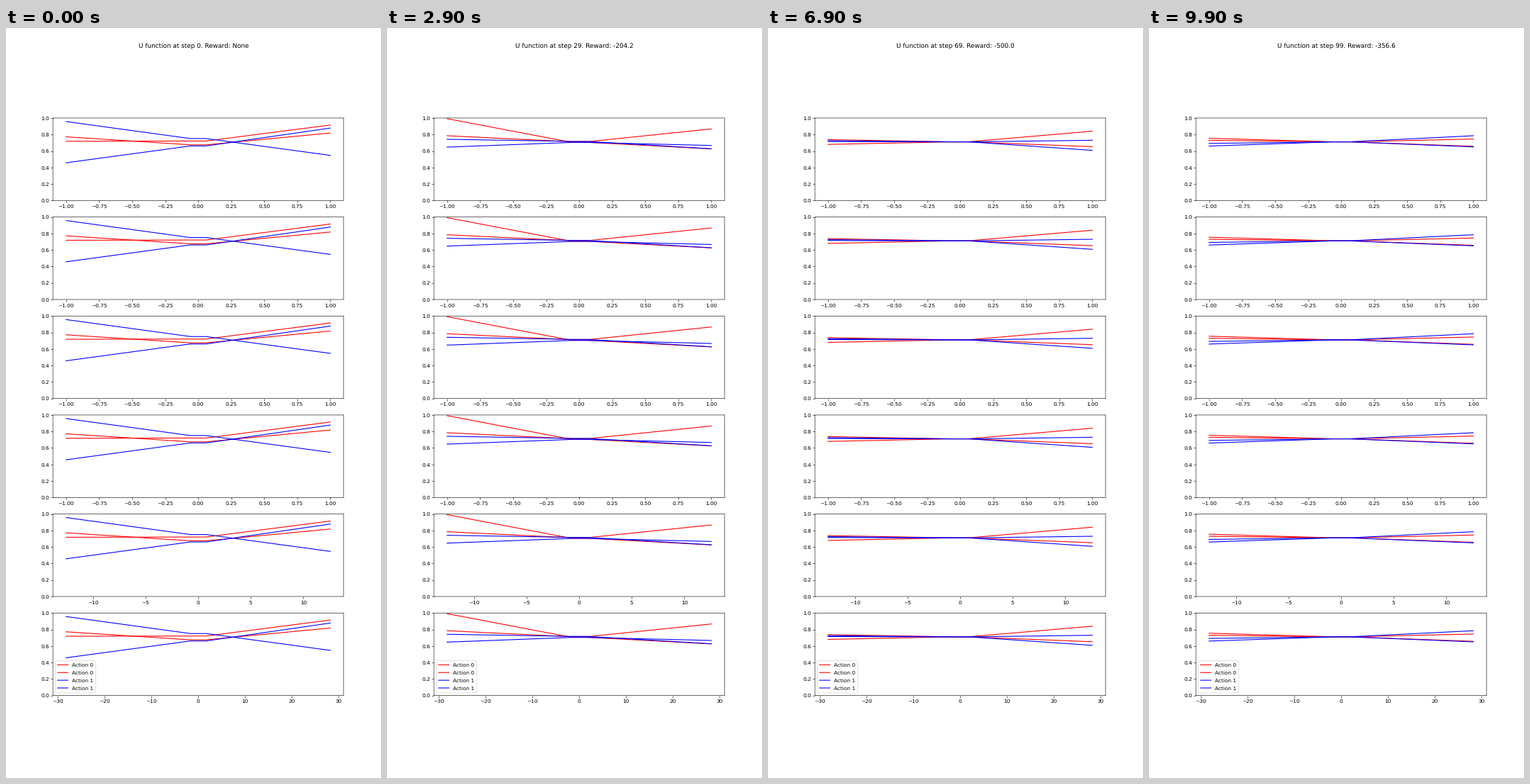
These frames come from a looping animation (529 by 1058 pixels, 10000 ms). A matplotlib script:

```python
import numpy as np
import matplotlib.pyplot as plt
from matplotlib.animation import FuncAnimation

plt.rcParams.update({"font.family": "DejaVu Sans", "text.hinting": "none",
                     "path.snap": False})

STEPS = 100
LEVEL = 0.711   # all curves settle around this value at x = 0
HINGE = 0.06    # half width of the flat middle part
X = np.linspace(-1, 1, 101)
SPANS = [1, 1, 1, 1, 4 * np.pi, 9 * np.pi]

# Reward and curve ends at a few key steps, linear in between.
KEYS = [0, 15, 29, 54, 69, 81, 99]
REWARDS = [-500, -341.6, -204.2, -500, -500, -472.5, -356.6]


class Curve:
    def __init__(self, color, label, offset, left, right, dip=0):
        self.color, self.label = color, label
        self.offset, self.left, self.right, self.dip = offset, left, right, dip

    def values(self, step):
        """Two straight arms that meet in a flat middle."""
        mid = LEVEL + self.offset * np.exp(-step / 15)
        left = np.interp(step, KEYS, self.left)
        left -= self.dip * np.sin(np.pi * min(step / 11, 1))
        right = np.interp(step, KEYS, self.right)
        return mid + (left - mid) * arm(-X) + (right - mid) * arm(X)


def arm(x):
    return np.maximum(x - HINGE, 0) / (1 - HINGE)


CURVES = [
    Curve("red", "Action 0", -0.036,
          left=[0.772, 1.045, 0.992, 0.715, 0.738, 0.755, 0.755],
          right=[0.818, 0.685, 0.625, 0.615, 0.652, 0.680, 0.657]),
    Curve("red", "Action 0", 0.01,
          left=[0.718, 0.910, 0.785, 0.675, 0.680, 0.722, 0.730],
          right=[0.915, 0.997, 0.867, 0.917, 0.840, 0.790, 0.745]),
    Curve("blue", "Action 1", 0.04,
          left=[0.957, 0.815, 0.742, 0.812, 0.725, 0.727, 0.692],
          right=[0.547, 0.783, 0.627, 0.583, 0.608, 0.610, 0.650]),
    Curve("blue", "Action 1", -0.05, dip=0.09,
          left=[0.457, 0.457, 0.647, 0.718, 0.715, 0.702, 0.660],
          right=[0.878, 0.800, 0.667, 0.645, 0.730, 0.755, 0.785]),
]


def heading(step):
    reward = f"{np.interp(step, KEYS, REWARDS):.1f}" if step else "None"
    return f"U function at step {step}. Reward: {reward}"


fig, axes = plt.subplots(6, 1, figsize=(10, 20), dpi=52.9)
title = fig.suptitle(heading(0))
panels = []
for ax, span in zip(axes, SPANS):
    panels.append([ax.plot(X * span, c.values(0), color=c.color, label=c.label)[0]
                   for c in CURVES])
    ax.set_ylim(0, 1)
legend = axes[-1].legend(loc="lower left", labelspacing=0.56)


def update(step):
    values = [c.values(step) for c in CURVES]
    for lines in panels:
        for line, y in zip(lines, values):
            line.set_ydata(y)
    # The legend steps aside when a curve dips into its corner.
    blocked = min(y[0] for y in values) < 0.43
    legend.set_loc("lower right" if blocked else "lower left")
    title.set_text(heading(step))
    return [title, legend] + sum(panels, [])


anim = FuncAnimation(fig, update, frames=STEPS, interval=100,
                     init_func=lambda: update(0), repeat=True, repeat_delay=0)
plt.show()
```
